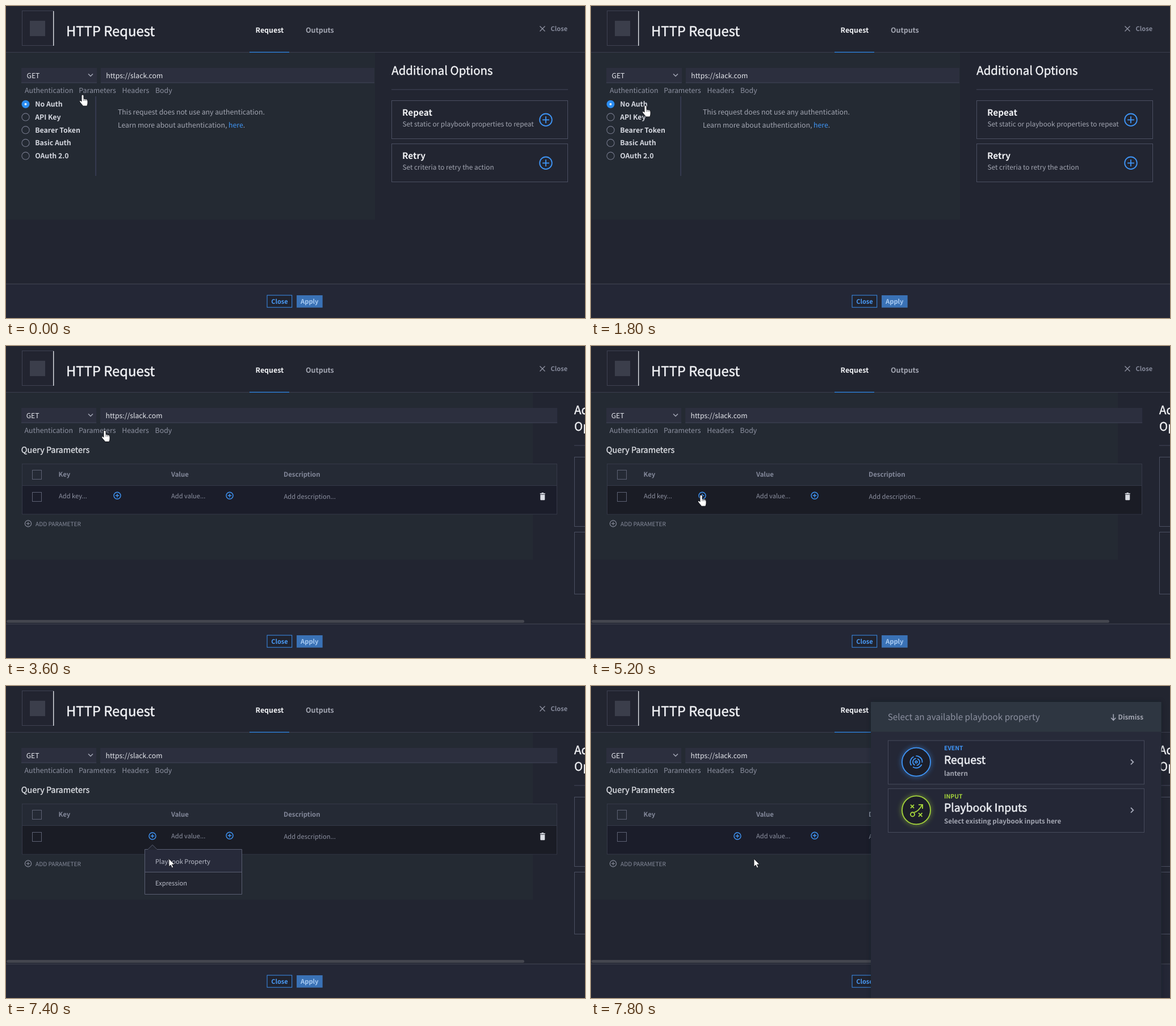
An HTML page that plays this animation: 1020x549 px, repeating every 8000 ms.

```html
<!DOCTYPE html>
<html lang="en">
<head>
<meta charset="utf-8">
<title>HTTP Request</title>
<style>
  html, body { margin: 0; width: 100%; height: 100%; overflow: hidden; background: #222531; }
  svg { display: block; width: 100vw; height: 100vh; }
  text {
    font-family: "Noto Sans CJK JP", "Noto Sans CJK SC", "Noto Sans CJK", "Source Sans Pro", "Open Sans", sans-serif;
    text-rendering: geometricPrecision;
    white-space: pre;
  }
</style>
</head>
<body>
<svg id="stage" viewBox="0 0 1020 549"></svg>
<script>
const LOOP = 8000;
const BLUE = '#3f95f6', GREEN = '#a5d53b', WHITE = '#f2f3f6', SOFT = '#a3a6b2', DIM = '#8d91a1', LINE = '#43475a';

const text = (x, y, size, fill, str, extra = '') =>
  `<text x="${x}" y="${y}" font-size="${size}" fill="${fill}" ${extra}>${str}</text>`;
const bold = (x, y, size, fill, str) => text(x, y, size, fill, str, 'font-weight="700"');
// Medium weight: regular outlines thickened in proportion to the size.
const medium = (x, y, size, fill, str, gain = 0.02) =>
  text(x, y, size, fill, str, `stroke="${fill}" stroke-width="${size * gain}"`);
const rect = (x, y, w, h, fill, stroke = 'none', extra = '') =>
  `<rect x="${x}" y="${y}" width="${w}" height="${h}" fill="${fill}" stroke="${stroke}" ${extra}/>`;
const path = (d, stroke, width = 1, fill = 'none') =>
  `<path d="${d}" fill="${fill}" stroke="${stroke}" stroke-width="${width}"/>`;
const circle = (x, y, r, stroke, width = 1, fill = 'none', extra = '') =>
  `<circle cx="${x}" cy="${y}" r="${r}" fill="${fill}" stroke="${stroke}" stroke-width="${width}" ${extra}/>`;
const plus = (x, y, r, color = BLUE, width = 1.4) => {
  const a = r * 0.55;
  return circle(x, y, r, color, width) + path(`M${x - a} ${y}h${2 * a}M${x} ${y - a}v${2 * a}`, color, width);
};
// Content visible from one time to another.
const during = (from, to, content) => `<g data-from="${from}" data-to="${to}">${content}</g>`;

const header = () =>
  rect(0, 0, 1020, 81, '#222530') +
  rect(0, 81, 1020, 1, '#3b3e4d') +
  rect(28.5, 8.5, 55, 61, '#222430', '#3f4252') +
  rect(83, 9, 1.4, 61, '#dfe1e7') +
  rect(42, 26, 27, 27, '#3b3e4b') +
  medium(106, 52.7, 23.8, WHITE, 'HTTP Request') +
  bold(439.6, 47, 12.4, WHITE, 'Request') +
  bold(528, 47, 12.4, SOFT, 'Outputs') +
  rect(429, 80.7, 70, 1.7, '#2f86e4') +
  path('M940.5 35.5l9 9m0-9l-9 9', '#8f92a2', 1.4) +
  bold(959.5, 44, 11.1, '#85899a', 'Close');

const footer = () =>
  rect(0, 489, 1020, 60, '#242736') +
  rect(0, 488.5, 1020, 1.3, '#3d404e') +
  rect(460, 509, 43.7, 21.2, '#20232f', '#3b8ff0') +
  bold(467.3, 524, 11, '#4a9bf8', 'Close') +
  rect(512, 509, 45.7, 21.7, '#3a72b6') +
  bold(519, 524, 11.2, '#a9cbf2', 'Apply');

const requestFields = (dx, urlWidth) =>
  rect(27, 109, 133 + dx, 26, '#2c2f3e') +
  rect(27, 134.5, 133 + dx, 1, LINE) +
  rect(167 + dx, 109, urlWidth, 26, '#2c2f3e') +
  rect(167 + dx, 134.5, urlWidth, 1, LINE) +
  text(36.5 + dx, 126.5, 12.2, '#e6e8ed', 'GET') +
  path('M145 119.5l4 4 4-4', '#a4a8b7', 1.5) +
  text(176.3 + dx, 126.8, 12.25, '#e6e8ed', 'https://slack.com') +
  [['Authentication', 33], ['Parameters', 128.3], ['Headers', 204.6], ['Body', 263]]
    .map(([name, x]) => text(x + dx / 2, 152.8, 12.35, DIM, name)).join('');

const authView = () => {
  const radios = ['No Auth', 'API Key', 'Bearer Token', 'Basic Auth', 'OAuth 2.0'].map((name, i) => {
    const y = 172.7 + i * 22.75;
    const dot = i ? circle(34.5, y, 6.6, '#74788a', 1.1)
      : circle(34.5, y, 7, 'none', 0, '#2b8df2') + circle(34.5, y, 2, 'none', 0, WHITE);
    return dot + bold(51.2, y + 4.4, 12.3, '#d4d7df', name);
  }).join('');
  const card = (y, title, note) =>
    rect(679.5, y, 310, 67, '#222531', '#4b4f61') +
    bold(698, y + 26.5, 15.3, WHITE, title) +
    text(698.5, y + 45.8, 11.84, SOFT, note) +
    plus(951, y + 33.8, 10.8, BLUE, 1.8);
  return rect(0, 82, 650, 294, '#242a33') + requestFields(0, 482) + radios +
    rect(157.5, 159, 1.2, 140, '#414562') +
    text(197, 190.5, 12.25, SOFT, 'This request does not use any authentication.') +
    text(197, 214, 12.25, SOFT, `Learn more about authentication, <tspan fill="${BLUE}">here</tspan>.`) +
    medium(679.3, 120.7, 20.4, WHITE, 'Additional Options') +
    rect(679, 146.5, 311, 1, LINE) +
    card(166.5, 'Repeat', 'Set static or playbook properties to repeat') +
    card(242.5, 'Retry', 'Set criteria to retry the action');
};

const trash = (x, y) =>
  `<g fill="#d9dce3">${rect(x - 4.5, y - 6, 9, 1.6, '#d9dce3')}${rect(x - 1.7, y - 7, 3.4, 1.5, '#d9dce3')}
  <path d="M${x - 4} ${y - 3.6}h8v8.6q0 1.3-1.3 1.3h-5.4q-1.3 0-1.3-1.3z"/></g>`;

const menu = () =>
  path('M244.5 287.5H250l8-8 8 8H415.5V366.5H244.5z', '#5a5f72', 1, '#222530') +
  during(6600, LOOP, rect(245, 288, 170, 39, '#272a3a')) +
  path('M244.5 327.5H415.5', '#5a5f72') +
  text(263, 312.5, 11.15, '#b9bcc8', 'Playbook Property') +
  text(263, 351.2, 11.15, '#b9bcc8', 'Expression');

const paramsView = () =>
  rect(0, 82, 928, 294, '#242a33') + requestFields(-0.8, 805) +
  medium(26.8, 188, 14.4, '#e3e5ea', 'Query Parameters') +
  rect(28.5, 207.5, 942, 88.5, '#1b1d2a', '#353948') +
  during(5000, 7600, rect(29, 246, 941, 49.5, '#1a1c25')) +
  rect(29, 208, 941, 37, '#252a35') +
  rect(29, 245, 941, 1, '#353948') +
  [218.5, 257.5].map(y => rect(46.5, y, 16, 16, 'none', '#5d6173')).join('') +
  [['Key', 92.5], ['Value', 291], ['Description', 489]]
    .map(([name, x]) => bold(x, 230.2, 11.4, '#83889a', name)).join('') +
  during(0, 5600, text(93, 268, 11.15, DIM, 'Add key...') + plus(196, 263.3, 6)) +
  during(5600, LOOP, plus(258, 264, 6)) +
  text(291, 268, 11.15, DIM, 'Add value...') + plus(394, 263.3, 6) +
  text(489.5, 269, 11.15, DIM, 'Add description...') +
  trash(945.3, 265) +
  plus(39, 312.5, 5.6, '#8a8e9e', 1.1) +
  text(52, 316.6, 10.2, '#858a9a', 'ADD PARAMETER') +
  medium(1001, 120, 20.4, WHITE, 'Additional') +
  medium(1001, 148.5, 20.4, WHITE, 'Options') +
  rect(1001, 174.5, 19, 1, LINE) +
  rect(1001.5, 195.5, 60, 122, '#222531', '#4b4f61') +
  rect(1001.5, 327.5, 60, 109, '#222531', '#4b4f61') +
  rect(1, 482, 912, 5, '#44464f', 'none', 'rx="2.5"') +
  during(5600, 7600, menu());

const targetIcon = color =>
  circle(0, 0, 1.8, color, 1.7) +
  circle(0, 0, 6, color, 1.8, 'none', 'stroke-dasharray="15.5 3.3" transform="rotate(-70)"') +
  circle(0, 0, 10.5, color, 1.8, 'none', 'stroke-dasharray="18 4" transform="rotate(25)"');

const routeIcon = color =>
  path('M-10-9.5l6 6m0-6l-6 6M4 5l6.5 6.5m0-6.5L4 11.5', color, 1.9) +
  circle(-6.5, 7.5, 3.6, color, 1.9) +
  path('M-3.5 4Q4 2 10-8.5M4-9.5h7v7', color, 1.9);

const panel = () => {
  const card = (y, color, icon, kind, title, note) =>
    rect(523.5, y, 451, 76.8, '#242736', '#474b5c') +
    `<g transform="translate(573 ${y + 37.7})">` +
    circle(0, 0, 25, color, 4, color, 'opacity=".4" filter="url(#glow)"') +
    circle(0, 0, 25, color, 1.8, '#1c1e29') + icon(color) + '</g>' +
    bold(622, y + 17, 10.4, color, kind) +
    medium(622, y + 40.5, 19.3, '#e8eaef', title, 0.035) +
    bold(622, y + 61.7, 11.6, SOFT, note) +
    path(`M951 ${y + 33.5}l4.3 4.3-4.3 4.3`, '#a4a8b7', 1.9);
  return rect(493, 28, 511.5, 700, '#10121a', 'none', 'opacity=".35" filter="url(#glow)"') +
    rect(493, 28, 511.5, 700, '#272a39') +
    rect(493, 28, 511.5, 52.5, '#2e3641') +
    text(522.7, 60.3, 15.25, DIM, 'Select an available playbook property') +
    path('M920.3 49.5v10.5m-4-4l4 4.3 4-4.3', '#a4a8b7', 1.6) +
    bold(928.5, 59, 11.8, SOFT, 'Dismiss') +
    card(96, BLUE, targetIcon, 'EVENT', 'Request', 'lantern') +
    card(180.7, GREEN, routeIcon, 'INPUT', 'Playbook Inputs', 'Select existing playbook inputs here');
};

const pointers = {
  hand: path('M-2 2a2 2 0 0 1 4 0v5l5 1q2 .6 2 3v4q0 2-1 4v1h-8v-1l-5-6q-1-2 .5-2.5t2.5 1.5z', '#15161c', 1, '#fff') +
    path('M2 7v4M4.6 8v3M7 9v2', '#33353d', 0.8),
  arrow: path('M0 0v14l3.2-3 2.2 5 2.4-1-2.2-4.9h4.4z', '#15161c', 0.9, '#fff'),
  beam: path('M-3-6q3 0 3 1.5q0-1.5 3-1.5M0-4.5v9M-3 6q3 0 3-1.5q0 1.5 3 1.5', '#e4e6ea', 1.1)
};

// Time, pointer, position.
const moves = [
  [0, 'hand', 135, 156], [200, 'hand', 137, 155], [400, 'hand', 139, 153], [600, 'hand', 140, 152],
  [800, 'hand', 141, 152], [1400, 'hand', 128, 158], [1600, 'hand', 106, 171], [1800, 'hand', 96, 175],
  [2600, 'hand', 116, 169], [2800, 'hand', 156, 154], [3000, 'hand', 174, 148.5],
  [4400, 'hand', 176, 156], [4600, 'arrow', 181, 181], [4800, 'arrow', 188, 222],
  [5000, 'hand', 193, 254], [5200, 'hand', 194, 262], [5600, 'hand', 194, 262],
  [5800, 'beam', 198, 270], [6200, 'beam', 206, 273], [6400, 'beam', 224, 281],
  [6600, 'arrow', 245, 293], [6800, 'arrow', 275, 301], [7000, 'arrow', 287, 304]
];
const panelRise = [[0, 60], [7800, 0]];

const stage = document.getElementById('stage');
stage.innerHTML =
  `<defs><filter id="glow" x="-40%" y="-40%" width="180%" height="180%"><feGaussianBlur stdDeviation="4"/></filter></defs>` +
  rect(0, 0, 1020, 549, '#222531') +
  header() + during(0, 3400, authView()) + during(3400, LOOP, paramsView()) + footer() +
  during(7600, LOOP, `<g id="panel">${panel()}</g>`) +
  `<g id="pointer">${Object.entries(pointers).map(([kind, d]) => `<g data-kind="${kind}">${d}</g>`).join('')}</g>`;

const timed = [...stage.querySelectorAll('[data-from]')];
const kinds = [...stage.querySelectorAll('[data-kind]')];
const pointer = document.getElementById('pointer');
const sheet = document.getElementById('panel');
const show = (el, on) => { el.style.display = on ? '' : 'none'; };
const stepAt = (table, t) => table.filter(step => step[0] <= t).pop();

function draw(t) {
  for (const el of timed) show(el, t >= +el.dataset.from && t < +el.dataset.to);
  const [, kind, x, y] = stepAt(moves, t);
  for (const el of kinds) show(el, el.dataset.kind === kind);
  pointer.setAttribute('transform', `translate(${x} ${y})`);
  sheet.setAttribute('transform', `translate(0 ${stepAt(panelRise, t)[1]})`);
}

const start = performance.now();
function tick() {
  draw((performance.now() - start) % LOOP);
  requestAnimationFrame(tick);
}
tick();
</script>
</body>
</html>
```
